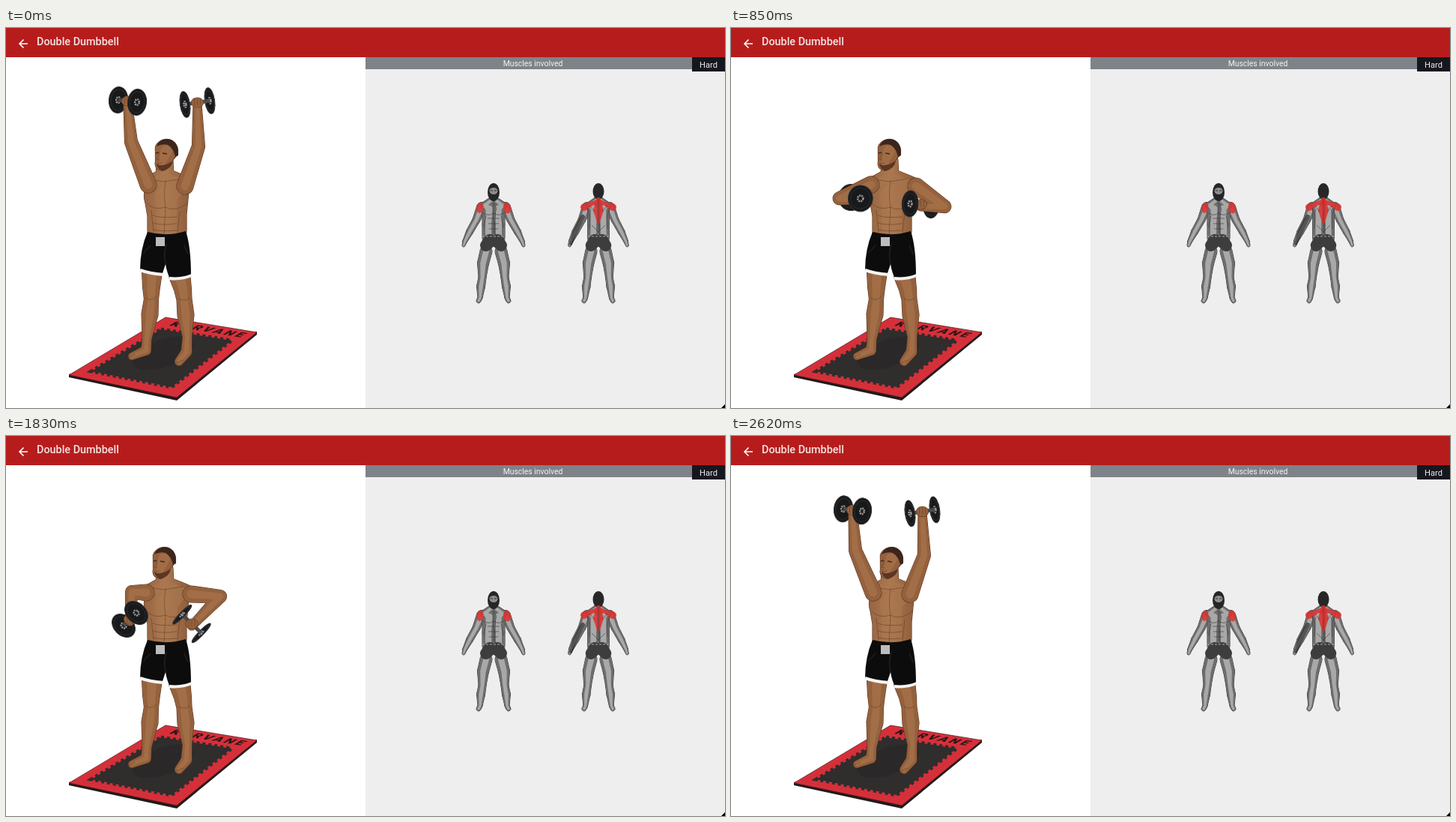
An HTML page for the animation above (2.7 s loop, 960 by 507 pixels).

```html
<!DOCTYPE html>
<html lang="en">
<head>
<meta charset="utf-8">
<title>Double Dumbbell</title>
<style>
  html, body { margin: 0; width: 100%; height: 100%; overflow: hidden; background: #fff; }
  svg { display: block; width: 100%; height: 100%; font-family: Roboto, sans-serif; }
  .skin { fill: #95613d; stroke: #5a3824; stroke-width: 1.2; paint-order: stroke; }
  .skin-core { fill: #ac7850; opacity: .55; }
  .steel { fill: #6d6d6d; stroke: #383838; stroke-width: 1; paint-order: stroke; }
  .steel-core { fill: #bdbdbd; opacity: .75; }
  .line { fill: none; stroke: #5c381f; opacity: .5; stroke-linecap: round; }
  .muscle { fill: none; stroke: #3a3a3a; stroke-width: .9; opacity: .7; }
  .red { fill: #dc3230; opacity: .88; }
  .cloth { fill: #3d3d3d; }
  .plate { fill: #18191b; stroke: #303133; }
  .bar { stroke: #4a4b4d; stroke-width: 5; }
</style>
</head>
<body>
<svg viewBox="0 0 960 507" preserveAspectRatio="none">
  <defs>
    <linearGradient id="chest"><stop stop-color="#946240"/><stop offset=".45" stop-color="#aa774f"/><stop offset="1" stop-color="#8b5a38"/></linearGradient>
    <g id="half">
      <path class="steel" data-chain="16,239,6.500 23,256,5 32,272,4.500 38,284,3 40,290,2"/>
      <path class="steel" data-chain="10,298,8 14,314,7.500 15,333,5 17,345,5.500 18,360,3 20,364,3"/>
      <path class="steel" data-chain="2,229,4 12,237,5 6,241,9 7,262,8 7,280,8"/>
      <path class="cloth" data-chain="5,284,9 10,290,8"/>
    </g>
    <g id="body"><use href="#half"/><use href="#half" transform="scale(-1 1)"/></g>
  </defs>

  <rect width="960" height="39" fill="#b71c1c"/>
  <path d="M29 21H18M23.5 15.5L18 21l5.500 5.500" fill="none" stroke="#fff" stroke-width="1.6"/>
  <text x="41" y="23" font-size="14.4" font-weight="500" fill="#f6e4e4">Double Dumbbell</text>
  <rect x="480" y="39" width="480" height="468" fill="#eee"/>
  <rect x="480" y="39" width="480" height="16" fill="#7e8389"/>
  <text x="703.5" y="51" font-size="10.4" text-anchor="middle" fill="#f4f4f4">Muscles involved</text>
  <rect x="916" y="39" width="44" height="19" fill="#16171e"/>
  <text x="938" y="53" font-size="11.1" text-anchor="middle" fill="#eee">Hard</text>
  <path d="M960 502v5h-5z"/>

  <g transform="translate(651 0)">
    <use href="#body"/>
    <ellipse cy="219" rx="8" ry="12" fill="#262626"/>
    <ellipse cy="217.5" rx="5.500" ry="4.500" fill="#8d8d8d"/>
    <path d="M-4 217h3M1 217h3" stroke="#333"/>
    <ellipse class="red" cx="-18" cy="240" rx="4.500" ry="7" transform="rotate(12 -18 240)"/>
    <ellipse class="red" cx="18" cy="240" rx="5" ry="7.500" transform="rotate(-12 18 240)"/>
    <path class="muscle" d="M-15 246q8 6 15 1q7 5 15-1M0 234v40M-8 254h16M-7 261h14M-6 268h12M-10 250l-3 16M10 250l3 16"/>
    <path d="M-15 278h30" stroke="#aaa" stroke-dasharray="3 2"/>
  </g>
  <g transform="translate(791 0)">
    <use href="#body" transform="scale(.96 1)"/>
    <path data-chain="-21,252,3 -31,272,3 -37,288,2" opacity=".5"/>
    <ellipse cy="218" rx="7.500" ry="11" fill="#272727"/>
    <path class="red" data-chain="0,229,3 0,243,7 0,259,2"/>
    <path class="red" data-chain="-19,239,5 -8,234,2.500 0,231,3 8,234,2.500 19,239,5"/>
    <path class="muscle" d="M0 228v46M-15 240q5 10 3 28M15 240q-5 10-3 28M-12 237l7 8M12 237l-7 8M-9 263l9 9l9-9"/>
    <path d="M-14 278h28" stroke="#aaa" stroke-dasharray="3 2"/>
  </g>

  <path fill="#211a1b" d="M84 462V466L228 497L335 409V405z"/>
  <path fill="#d5303a" stroke="#4b171b" stroke-width=".7" d="M213 386L335 406L228 493L84 463z"/>
  <path fill="#302d2d" stroke="#302d2d" stroke-width="5" stroke-dasharray="4 4" d="M207 402L301 417L221 479L114 458z"/>
  <ellipse cx="210" cy="434" rx="43" ry="18" transform="rotate(-20 210 434)" fill="#2a2828"/>
  <text transform="matrix(.985 .162 -.78 .46 217 397)" font-size="17" font-weight="900" letter-spacing="3.500" fill="#2b1518">KORVANE</text>

  <path class="skin" data-chain="195,325,13.500 194,345,11.500 194,362,9.500 192,382,11 188,415,6 187,430,6.500 168,438,4.500"/>
  <path class="skin" data-chain="232,331,14 236,348,11.500 238,362,10 240,383,11 242,412,6 241,432,7 231,445,5.500"/>
  <path class="line" d="M187 360q7 6 14-2M231 361q8 5 15-1M164 439l8-3M227 447l9-4"/>
  <path class="skin" style="fill:url(#chest)" data-chain="190,209,10 212,199,12 212,178,11 212,199,12 240,208,10 214,224,29.500 215,250,26 215,270,26"/>
  <path class="line" d="M188 234q9 10 25 5q14 8 30-6M213 204q-3 18 0 35l-2 37M196 250q8 4 32 2M196 260q12 4 32 1M197 269q10 3 30 1M194 243l3 29M232 245l-3 27M192 202l19 3l25-4"/>
  <g id="head">
    <path class="skin" data-chain="214,164,15.500 208,181,9"/>
    <path fill="#5c3625" d="M201 181Q208 187 223 177Q222 187 209 191Q202 188 201 181z"/>
    <path fill="#3c261c" d="M201 158Q205 147 217 148Q231 151 230 170L226 172Q224 161 216 156Q208 154 201 158z"/>
    <path d="M200 167l4-1M209 167l6 1" stroke="#402719" stroke-width="1.5"/>
    <path class="line" d="M205 167l-4 8l4 1M202 181l6-1M224 167q4 3 0 7"/>
  </g>
  <path fill="#0c0c0d" d="M189 272Q215 279 240 271Q247 292 247 330L219 334Q215 327 213 315L209 327L179 323Q179 295 189 272z"/>
  <path d="M179 323Q193 328 210 329M218 334Q233 336 248 330" fill="none" stroke="#f4f4f4" stroke-width="4"/>
  <path d="M214 288Q210 301 213 315M184 300l9-10M238 290l5 12" fill="none" stroke="#2b2b2d"/>
  <rect x="200" y="279" width="12" height="12" fill="#bdbdbd"/>
  <g id="arms"></g>
</svg>
<script>
const LOOP = 2700, STEPS = 35, DISC = 17.5, AXIS = 18;

// Each arm: elbow x y, grip x y, offset from grip to plate x y
const overhead = { left: [167, 152, 162.5, 97.5, 12.5, 1.5], right: [257, 158, 255.5, 99.5, 16.5, -2.5] };
const rack = { left: [144, 215, 163.5, 165, 12.5, 2], right: [280, 224, 255.5, 169.5, 15.5, -.5] };
const hang = { left: [175, 242, 170, 301, -1, -1], right: [260, 255, 250.5, 314.5, 12.5, 2.5] };
const row = { left: [168, 208, 165.5, 244.5, 8.5, -8.5], right: [286, 214, 248, 250.5, 12.7, 12.3] };

const swing = u => (1 - Math.cos(Math.PI * u)) / 2;
const settle = u => Math.sin(Math.PI / 2 * u);
const MOVES = [
  [0, 8, overhead, rack, swing],
  [8, 18, rack, hang, settle],
  [18, 20, hang, hang, swing],
  [20, 24, hang, row, swing],
  [24, 27, row, rack, swing],
  [27, 35, rack, overhead, settle]
];

// Tapered outline around two circles
function segment([ax, ay, ra], [bx, by, rb]) {
  const len = Math.hypot(bx - ax, by - ay) || 1, nx = (ay - by) / len, ny = (bx - ax) / len;
  return `M${ax + nx * ra} ${ay + ny * ra}L${bx + nx * rb} ${by + ny * rb}` +
    `A${rb} ${rb} 0 0 0 ${bx - nx * rb} ${by - ny * rb}L${ax - nx * ra} ${ay - ny * ra}` +
    `A${ra} ${ra} 0 0 0 ${ax + nx * ra} ${ay + ny * ra}z`;
}

function chain(joints, scale = 1) {
  const scaled = joints.map(([x, y, r]) => [x, y, r * scale]);
  return scaled.slice(1).map((joint, i) => segment(scaled[i], joint)).join('');
}

function armPose(side, mix, from, to, outward) {
  const a = from[side], b = to[side];
  const pose = a.map((v, i) => v + (b[i] - v) * mix);
  pose[0] += outward * Math.sin(Math.PI * mix) * Math.abs(b[3] - a[3]) * .1;
  return pose;
}

// A disc seen along its axis narrows as the axis turns sideways
function plate(x, y, ox, oy) {
  const turn = Math.sqrt(Math.max(.03, 1 - (ox * ox + oy * oy) / AXIS ** 2));
  const ring = (k, attrs) => `<ellipse rx="${DISC * turn * k}" ry="${DISC * k}" ${attrs}/>`;
  return `<g transform="translate(${x} ${y}) rotate(${Math.atan(oy / ox) * 180 / Math.PI})">` +
    ring(1, 'class="plate"') + ring(.8, 'fill="none" stroke="#2a2b2d"') +
    ring(.22, 'fill="none" stroke="#999" stroke-width="2.500" stroke-dasharray="2 1"') + '</g>';
}

function arm([ex, ey, gx, gy, ox, oy], sx, sy, near) {
  const joints = [[sx, sy, 11], [ex, ey, 8.5], [gx, gy + 3, 5.5]];
  const end = s => plate(gx + s * ox, gy + s * oy, ox, oy);
  return end(-near) +
    `<path class="bar" d="M${gx - ox} ${gy - oy}L${gx + ox} ${gy + oy}"/>
    <path class="skin" d="${chain(joints)}"/><path class="skin-core" d="${chain(joints, .5)}"/>
    <g transform="translate(${gx} ${gy})"><ellipse class="skin" rx="8" ry="6.500"/>
    <path class="line" d="M-4-5v8M0-5v8M4-5v8"/></g>` + end(near);
}

// Build the still shapes, with a lighter core on rounded ones
for (const path of document.querySelectorAll('[data-chain]')) {
  const joints = path.dataset.chain.split(' ').map(s => s.split(',').map(Number));
  path.setAttribute('d', chain(joints));
  const kind = path.getAttribute('class');
  if (kind !== 'skin' && kind !== 'steel') continue;
  const core = document.createElementNS(path.namespaceURI, 'path');
  core.setAttribute('class', kind + '-core');
  core.setAttribute('d', chain(joints, .5));
  path.after(core);
}

const arms = document.getElementById('arms'), head = document.getElementById('head');

function draw(now) {
  const step = Math.min(STEPS - 1, Math.floor((now % LOOP + 24) / LOOP * STEPS));
  const [start, stop, from, to, ease] = MOVES.find(move => step < move[1]);
  const mix = ease((step - start) / (stop - start));
  const left = armPose('left', mix, from, to, -1), right = armPose('right', mix, from, to, 1);
  const raised = Math.max(0, Math.min(1, (140 - left[3]) / 40));
  head.setAttribute('transform', `translate(${3 * raised - 3} 0)`);
  arms.innerHTML = arm(left, 187 + 3 * raised, 209, 1) + arm(right, 247 - 8 * raised, 211, -1);
  requestAnimationFrame(draw);
}
draw(performance.now());
</script>
</body>
</html>
```
